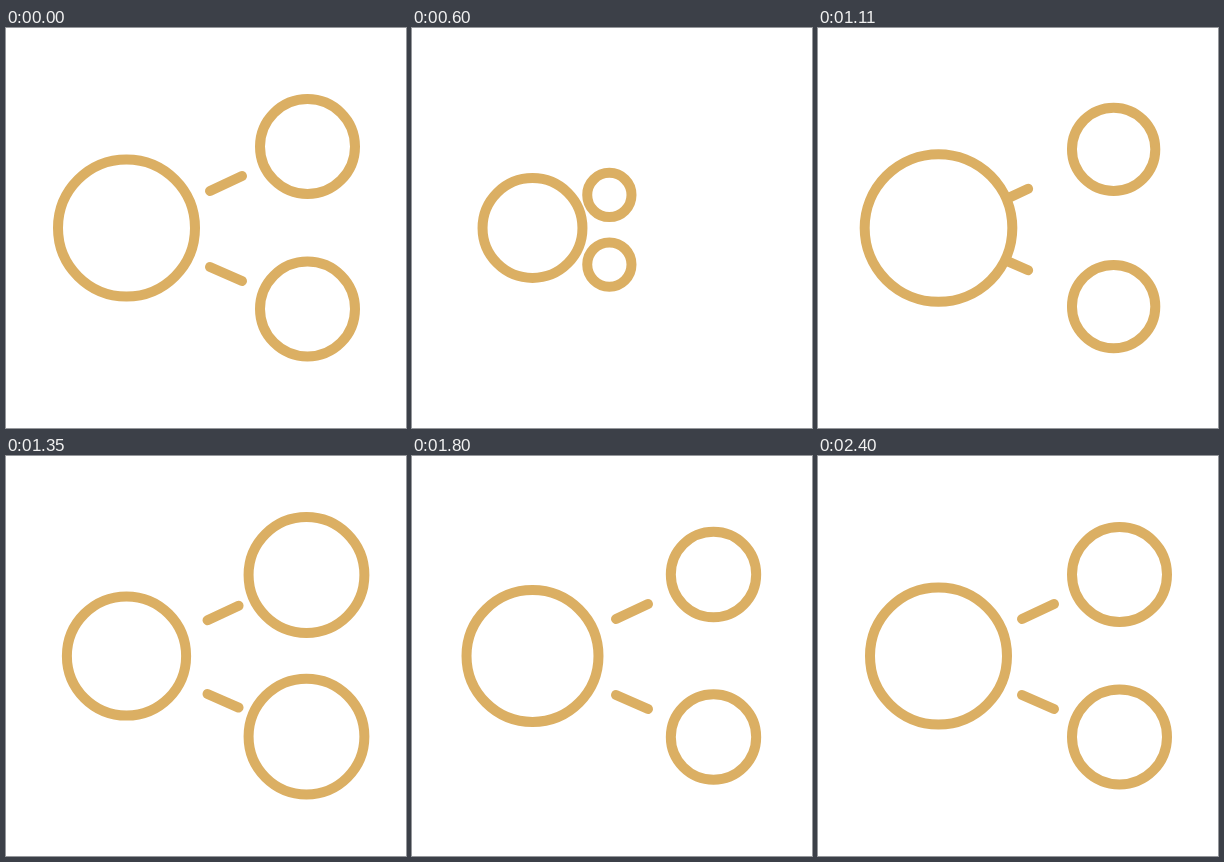
An HTML page that plays this animation: 400x400 px, repeating every 4.43 s.

```html
<!DOCTYPE html>
<html lang="en">
<head>
<meta charset="utf-8">
<title>Share icon</title>
<style>
  html, body { margin: 0; width: 100%; height: 100%; overflow: hidden; background: #fff; }
  svg { display: block; width: 100%; height: 100%; }
  circle, line { fill: #fff; stroke: #dbaf63; stroke-width: 10; stroke-linecap: round; }
</style>
</head>
<body>
<svg viewBox="0 0 400 400">
  <line id="lineA"/><line id="lineB"/>
  <circle id="dotA"/><circle id="dotB"/>
  <circle id="hub" cx="120.5" cy="200"/>
</svg>
<script>
const LOOP = 4430, STEP = 30, END = 2400;
const CORE = [120.5, 205];

// [time, radius], eased in and out between keys
const hubKeys = [[30, 68.5], [510, 46.3], [935, 80.5], [1400, 59], [2010, 68.5]];
const dotKeys = [[180, 47.5], [620, 22], [790, 22], [1400, 58.5], [1900, 41], [2400, 47.5]];

const arms = [
  { id: 'A', rest: [301.5, 118.5], out: [352, 90.5], from: [204, 163], to: [236, 148], push: [66, -31] },
  { id: 'B', rest: [301.5, 281], out: [352, 300], from: [204, 239], to: [236, 253], push: [66, 29] }
];

const el = id => document.getElementById(id);
const frac = (t, a, b) => Math.min(1, Math.max(0, (t - a) / (b - a)));
const smooth = u => (1 - Math.cos(Math.PI * u)) / 2;
const mix = (p, q, u) => p.map((v, i) => v + (q[i] - v) * u);
const add = (p, q, u) => p.map((v, i) => v + q[i] * u);

function radius(keys, t) {
  let r = keys[0][1];
  for (let i = 1; i < keys.length; i++) {
    r += (keys[i][1] - keys[i - 1][1]) * smooth(frac(t, keys[i - 1][0], keys[i][0]));
  }
  return r;
}

// knocked outwards, swallowed by the hub, then released
function dotAt(arm, t) {
  if (t < 430) return mix(arm.rest, arm.out, smooth(frac(t, 290, 430)));
  if (t < 640) return mix(arm.out, CORE, frac(t, 430, 638) ** 2);
  const u = frac(t, 640, 1590);
  return mix(CORE, arm.rest, u < 1 ? 1 - 2 ** (-10 * u) : 1);
}

function lineEnd(arm, p, dot, t) {
  if (t < 640) {
    const pushed = add(p, arm.push, smooth(frac(t, 120, 420)));
    return mix(pushed, dot, smooth(frac(t, 360, 480)));
  }
  return mix(CORE, p, 1 - (1 - frac(t, 793, 1600)) ** 3);
}

function set(node, values) {
  for (const name in values) node.setAttribute(name, values[name].toFixed(2));
}

function draw(t) {
  set(el('hub'), { r: radius(hubKeys, t) });
  const r = radius(dotKeys, t);
  for (const arm of arms) {
    const dot = dotAt(arm, t);
    const [x1, y1] = lineEnd(arm, arm.from, dot, t);
    const [x2, y2] = lineEnd(arm, arm.to, dot, t);
    set(el('dot' + arm.id), { cx: dot[0], cy: dot[1], r });
    set(el('line' + arm.id), { x1, y1, x2, y2 });
  }
}

const start = performance.now();
function tick() {
  const t = (performance.now() - start) % LOOP;
  draw(Math.min(END, Math.floor(t / STEP) * STEP));
  requestAnimationFrame(tick);
}
tick();
</script>
</body>
</html>
```
